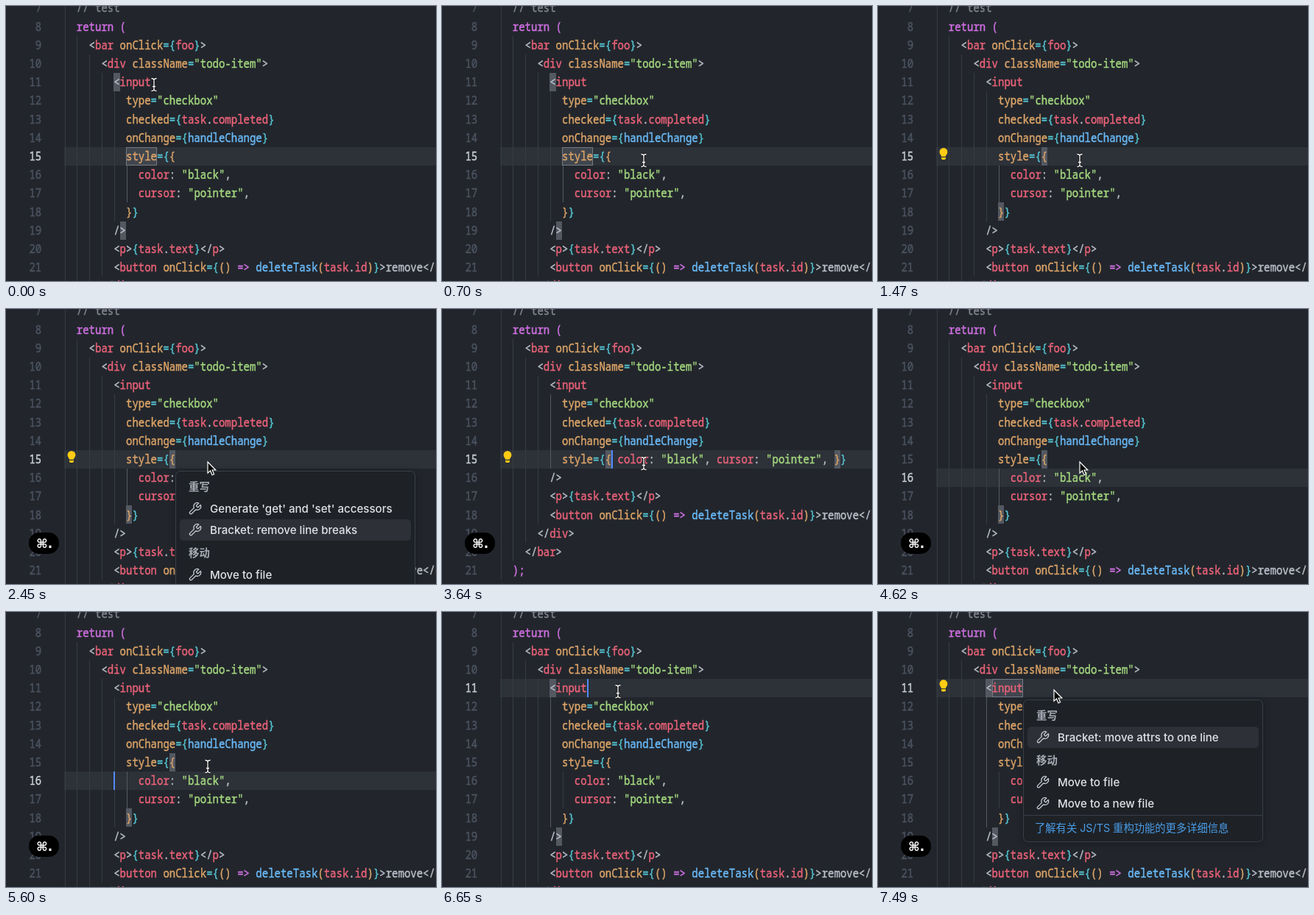
Recreate the animation shown at these times as an HTML page. Size 584 px wide and 374 px high, loop 8000 ms.

```html
<!DOCTYPE html>
<html lang="en">
<head>
<meta charset="utf-8">
<title>Bracket refactoring in an editor</title>
<style>
  html, body { margin: 0; width: 100%; height: 100%; overflow: hidden; background: #22262c; }
  svg { display: block; width: 584px; height: 374px; }
  text { white-space: pre; }
  .code text { font: 500 14px "Noto Sans Mono", monospace; }
  .code text, .code tspan { fill: currentColor; stroke: currentColor; stroke-width: .4px; }
  .ui { font: 500 15.1px Inter, "Noto Sans CJK SC", sans-serif; fill: #e0e2e6; }
  .head { font: 700 14.4px "Noto Sans CJK SC", "Noto Sans CJK", sans-serif; fill: #a6abb3; }
  .link { font: 14.3px Inter, "Noto Sans CJK SC", "Noto Sans CJK", sans-serif; fill: #4a9de8; }
  .key { font: bold 17px "DejaVu Sans", sans-serif; fill: #fff; text-anchor: middle; }
  .menu { filter: drop-shadow(0 1px 5px rgba(0, 0, 0, .3)); }
  .crisp { shape-rendering: crispEdges; }
</style>
</head>
<body>
<svg viewBox="0 0 584 374">
  <g id="under" class="crisp"></g>
  <g id="code" class="code"></g>
  <g id="over"></g>
</svg>
<script>
const LOOP = 8000, TICK = 70;
const CHAR = 8.4, ROW = 25.2, LEFT = 79, TALL = 1.22;
const $ = id => document.getElementById(id);
const colX = c => LEFT + c * CHAR;
const midY = n => 27.6 + (n - 8) * ROW;
const topY = n => Math.ceil(midY(n) - ROW / 2);
const esc = s => s.replace(/&/g, '&amp;').replace(/</g, '&lt;');

const INK = {
  g: '#7f848e', w: '#b8bdc8', r: '#eb6279', o: '#dca468',
  c: '#55c4d1', s: '#a4d87f', b: '#6abaf8', p: '#d070e2'
};

// Each line: [indent, runs]; a run starts with its ink key.
const HEAD = [
  [2, 'g// test'],
  [2, 'preturn ('],
  [4, 'w<~rbar ~oonClick~c={~rfoo~c}~w>'],
  [6, 'w<~rdiv ~oclassName~c=~s"todo-item"~w>'],
  [8, 'w<~rinput'],
  [10, 'otype~c=~s"checkbox"'],
  [10, 'ochecked~c={~rtask~w.~rcompleted~c}'],
  [10, 'oonChange~c={~bhandleChange~c}']
];
const SPLIT = [
  [10, 'ostyle~c={~o{'],
  [12, 'rcolor~w: ~s"black"~w,'],
  [12, 'rcursor~w: ~s"pointer"~w,'],
  [10, 'o}~c}']
];
const FLAT = [
  [10, 'ostyle~c={~o{ ~rcolor~w: ~s"black"~w, ~rcursor~w: ~s"pointer"~w, ~o}~c}']
];
const TAIL = [
  [8, 'w/>'],
  [8, 'w<~rp~w>~c{~rtask~w.~rtext~c}~w</~rp~w>'],
  [8, 'w<~rbutton ~oonClick~c={~o() ~p=> ~bdeleteTask~o(~rtask~w.~rid~o)~c}~w>remove</~rbutton~w>'],
  [6, 'w</~rdiv~w>'],
  [4, 'w</~rbar~w>'],
  [2, 'p);'],
  [0, 'o}']
];

const MATCH = {
  tag: [[8, 11], [9, 19]],
  split: [[17, 15], [10, 18]],
  flat: [[17, 15], [54, 15]]
};
const WORD = { style: [10, 15], input: [9, 11] };

const bracketMenu = action => [
  ['head', '重写'], ['item', "Generate 'get' and 'set' accessors"], ['item', action],
  ['head', '移动'], ['item', 'Move to file'], ['item', 'Move to a new file']
];
const MENU = {
  join: { x: 230, y: 220, h: 220, rows: bracketMenu('Bracket: remove line breaks') },
  split: { x: 230, y: 220, h: 220, rows: bracketMenu('Bracket: split to lines') },
  attrs: {
    x: 197, y: 119, h: 194, link: '了解有关 JS/TS 重构功能的更多详细信息',
    rows: [['head', '重写'], ['item', 'Bracket: move attrs to one line'],
      ['head', '移动'], ['item', 'Move to file'], ['item', 'Move to a new file']]
  }
};

const STEPS = [
  [0, { flat: 0, line: 15, match: 'tag', word: 'style', caret: 0, bulb: 0, menu: 0, sel: 1, badge: 0, arrow: 0 }],
  [840, { match: 'split', word: 0, caret: [18, 15] }],
  [1120, { bulb: 15 }],
  [1470, { caret: 0 }],
  [1750, { badge: 1 }],
  [1820, { menu: 'join' }],
  [1890, { arrow: 1 }],
  [2450, { sel: 2 }],
  [2590, { menu: 0 }],
  [2660, { flat: 1, match: 'flat' }],
  [2730, { arrow: 0, caret: [18, 15] }],
  [3150, { caret: 0 }],
  [3640, { caret: [18, 15] }],
  [3780, { badge: .65 }],
  [3850, { badge: .3 }],
  [3920, { badge: 1 }],
  [3990, { menu: 'split', sel: 1, caret: 0, arrow: 1 }],
  [4130, { sel: 2 }],
  [4550, { menu: 0, bulb: 0 }],
  [4620, { flat: 0, match: 'split', line: 16 }],
  [4690, { arrow: 0, caret: [8, 16] }],
  [5110, { caret: 0 }],
  [5600, { caret: [8, 16] }],
  [5810, { badge: .75 }],
  [5880, { badge: .5 }],
  [5950, { badge: .25 }],
  [6020, { badge: 0 }],
  [6160, { caret: 0 }],
  [6510, { line: 11, match: 'tag', caret: [14, 11] }],
  [6860, { bulb: 11, word: 'input' }],
  [7070, { caret: 0 }],
  [7350, { badge: 1 }],
  [7420, { menu: 'attrs', sel: 1 }],
  [7490, { arrow: 1 }]
];

// Pointer stops: [time, x, y]
const PATH = [
  [0, 201, 107], [280, 236, 142], [560, 277, 207], [700, 274, 210],
  [5740, 274, 210], [6020, 263, 178], [6090, 263, 178],
  [6300, 243, 120], [6370, 243, 120], [6510, 239, 108], [LOOP, 239, 108]
];

const stateAt = t => Object.assign({}, ...STEPS.filter(s => s[0] <= t).map(s => s[1]));

function pointerAt(t) {
  const i = PATH.findIndex(p => p[0] > t);
  const [t0, x0, y0] = PATH[i - 1], [t1, x1, y1] = PATH[i];
  const k = (t - t0) / (t1 - t0), e = k * k * (3 - 2 * k);
  return [x0 + (x1 - x0) * e, y0 + (y1 - y0) * e];
}

const rect = (x, y, w, h, fill, more = '') =>
  `<rect x="${x}" y="${y}" width="${w}" height="${h}" fill="${fill}" ${more}/>`;
const label = (cls, x, y, s) => `<text class="${cls}" x="${x}" y="${y}">${esc(s)}</text>`;
const codeText = (x, n, inner, more = '') =>
  `<text transform="translate(${x} ${midY(n) + 5.9}) scale(1 ${TALL})" ${more}>${inner}</text>`;

function codeLine([indent, runs], n) {
  const spans = runs.split('~').map(r => `<tspan color="${INK[r[0]]}">${esc(r.slice(1))}</tspan>`);
  return codeText(colX(indent), n, spans.join(''));
}

const linesOf = s => [...HEAD, ...(s.flat ? FLAT : SPLIT), ...TAIL];

function guides(s) {
  const deep = !s.flat && s.line > 11;
  const active = deep ? 10 : 8, from = deep ? 16 : 12, to = deep ? 17 : s.flat ? 15 : 18;
  return linesOf(s).map(([indent], i) => {
    const n = i + 7, y = topY(n);
    let out = '';
    for (let c = 0; c < indent; c += 2) {
      const lit = c === active && n >= from && n <= to;
      out += rect(Math.floor(colX(c)) + 1, y, 1, topY(n + 1) - y, lit ? '#555962' : '#363b43');
    }
    return out;
  }).join('');
}

function drawUnder(s) {
  const box = ([c, n]) => rect(colX(c), topY(n), CHAR, 25, '#535861');
  let out = rect(LEFT, topY(s.line), 505, 25, '#2d3138') + guides(s);
  out += MATCH[s.match].map(box).join('');
  if (s.word) {
    const [c, n] = WORD[s.word];
    out += rect(Math.round(colX(c)) + .5, topY(n) + .5, 41, 24, '#41464e', 'stroke="#747a84"');
  }
  return out;
}

function drawCode(s) {
  let out = linesOf(s).map((l, i) => codeLine(l, i + 7)).join('');
  for (let n = 7; n <= 22; n++)
    out += codeText(48.2, n, n, `text-anchor="end" color="${n === s.line ? '#c9cdd5' : '#4c5361'}"`);
  return out;
}

const wrench = (x, y) => `<path transform="translate(${x} ${y}) scale(.8)" fill="none" stroke="#c8ccd3"
  stroke-width="1.6" stroke-linejoin="round" d="M14.7 6.3a1 1 0 0 0 0 1.4l1.6 1.6a1 1 0 0 0 1.4 0l3.8-3.8
  a6 6 0 0 1-8 8l-6.9 6.9a2.1 2.1 0 0 1-3-3l6.9-6.9a6 6 0 0 1 8-8z"/>`;

function drawMenu({ x, y, h, rows, link }, sel) {
  let out = rect(x + .5, y + .5, 325, h - 1, '#1e2227', 'rx="6" stroke="#3a3f48" class="menu"');
  let top = y + 5, item = 0;
  for (const [kind, s] of rows) {
    if (kind === 'head') {
      out += label('head', x + 18, top + 22, s);
      top += 32;
      continue;
    }
    if (++item === sel) out += rect(x + 6, top, 314, 29, '#2d3036', 'rx="5"');
    out += wrench(x + 17, top + 5) + label('ui', x + 47, top + 20, s);
    top += 29;
  }
  if (link)
    out += rect(x, y + 157, 326, 1, '#3a3f48') + label('link', x + 16, y + 180, link);
  return out;
}

const bulb = n => `<g transform="translate(89 ${midY(n) - 4.8})" fill="#ffcb14">
  <path d="M-3 5.5C-3 3.5-5.4 2.6-5.4-.9a5.4 5.4 0 0 1 10.8 0C5.4 2.6 3 3.5 3 5.5z"/>
  <path d="M-3 6.7h6v1.2a2 2 0 0 1-2 2h-2a2 2 0 0 1-2-2z"/></g>`;

const badge = alpha => `<g opacity="${alpha}">${rect(31, 304, 41, 29, '#000', 'rx="14"')}
  ${label('key', 52, 324.5, '⌘.')}</g>`;

function pointer([x, y], arrow) {
  const beam = 'M-3.5-8.5Q0-8.5 0-6V6Q0 8.5-3.5 8.5M3.5-8.5Q0-8.5 0-6M0 6Q0 8.5 3.5 8.5M-2 2.5H2';
  const body = arrow
    ? `<path d="M0-2V13.2L3.5 9.9 6 15.8 8.6 14.7 6.1 9H10.8Z" fill="#000" stroke="#fff" stroke-width="1.2"/>`
    : `<path d="${beam}" fill="none" stroke="#111" stroke-width="3.2"/>
       <path d="${beam}" fill="none" stroke="#fff" stroke-width="1.3"/>`;
  return `<g transform="translate(${x} ${y})">${body}</g>`;
}

function drawOver(s, t) {
  let out = '';
  if (s.caret) out += rect(Math.round(colX(s.caret[0])), topY(s.caret[1]), 2, 25, '#528bff');
  if (s.bulb) out += bulb(s.bulb);
  if (s.menu) out += drawMenu(MENU[s.menu], s.sel);
  if (s.badge) out += badge(s.badge);
  return out + pointer(pointerAt(t), s.arrow);
}

let shown = -1, codeKey = '';
function frame(now) {
  const t = Math.floor(now % LOOP / TICK) * TICK;
  if (t !== shown) {
    shown = t;
    const s = stateAt(t), key = s.flat + '/' + s.line;
    $('under').innerHTML = drawUnder(s);
    if (key !== codeKey) $('code').innerHTML = drawCode(s);
    codeKey = key;
    $('over').innerHTML = drawOver(s, t);
  }
  requestAnimationFrame(() => frame(performance.now() - start));
}
const start = performance.now();
frame(0);
</script>
</body>
</html>
```
